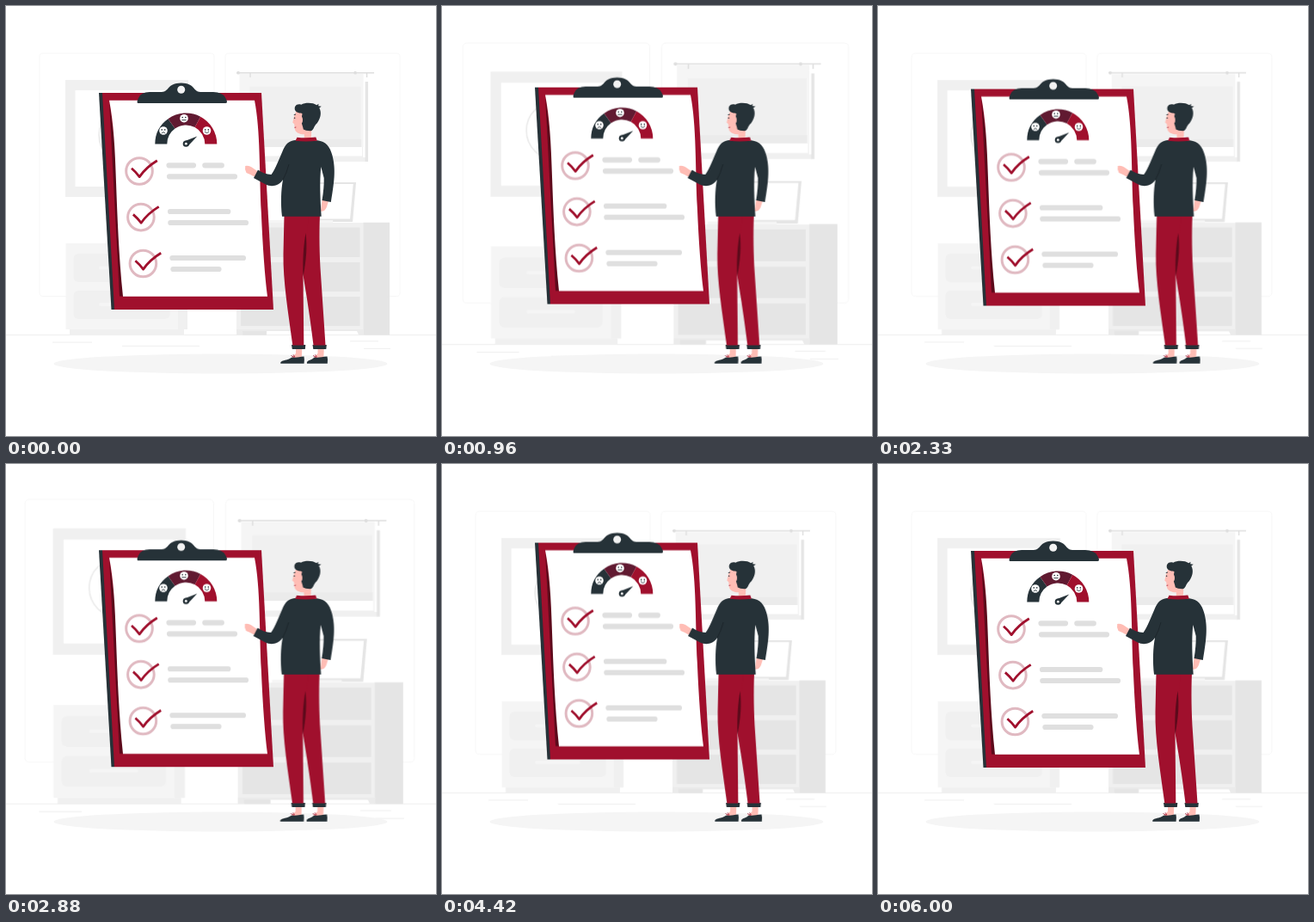
An HTML page for the animation above (6.04 s loop, 500 by 500 pixels).

```html
<!DOCTYPE html>
<html lang="en">
<head>
<meta charset="utf-8">
<title>Checklist</title>
<style>
  html, body { margin: 0; width: 100%; height: 100%; overflow: hidden; background: #fff; }
  svg { display: block; width: 100%; height: 100%; }

  /* 6 s of motion and a 40 ms rest in every loop */
  .room, .board, .man { animation: 6.04s linear infinite; }
  .room { animation-name: beat; transform-origin: 249px 225px; }
  .board { animation-name: float; }
  .man { animation-name: shake; }

  @keyframes beat {
    0%, 29.801%, 39.735%, 59.603%, 100% { transform: scale(1); }
    9.934%, 49.669% { transform: scale(1.1); }
  }
  @keyframes float {
    0%, 49.669%, 99.338%, 100% { transform: translateY(0); }
    24.834%, 74.503% { transform: translateY(-10px); }
  }
  @keyframes shake {
    0%, 49.669%, 99.338%, 100% { transform: translateX(0); }
    4.967%, 44.702%, 54.636%, 94.371% { transform: translateX(-1px); }
    9.934%, 39.735%, 59.603%, 89.404% { transform: translateX(2px); }
    14.901%, 24.834%, 34.768%, 64.57%, 74.503%, 84.437% { transform: translateX(-4px); }
    19.868%, 29.801%, 69.536%, 79.47% { transform: translateX(4px); }
  }

  .dark { fill: #263238; }
  .red { fill: #a0102d; }
  .maroon { fill: #5c0a1b; }
  .skin { fill: #ffbdb5; }
  .white { fill: #fff; }
  .g1 { fill: #f5f5f5; }
  .g2 { fill: #f0f0f0; }
  .g3 { fill: #ebebeb; }
  .g4 { fill: #e5e5e5; }
  .line { fill: none; stroke: #ebebeb; stroke-width: .8; }
  .bars { fill: none; stroke: #dfdfdf; stroke-width: 6.2; stroke-linecap: round; }
  .gauge path { fill: none; stroke-width: 14; }
  .ring { fill: none; stroke: #e0b9c1; stroke-width: 3; }
  .tick { fill: none; stroke: #a0102d; stroke-width: 2.8; stroke-linejoin: round; }
  .mouth { fill: none; stroke: #263238; stroke-width: .9; stroke-linecap: round; }
</style>
</head>
<body>
<svg viewBox="0 0 500 500">
  <defs>
    <g id="face">
      <circle class="white" r="4.8"/>
      <circle class="dark" cx="-1.8" cy="-1.1" r=".8"/>
      <circle class="dark" cx="1.8" cy="-1.1" r=".8"/>
    </g>
    <g id="check">
      <circle class="ring" cx="155" cy="192" r="15.3"/>
      <path class="tick" d="M146 188.8Q151 193 155.2 198.6Q163 187.500 175.800 179.800"/>
    </g>
    <g id="shoe">
      <path class="skin" d="M337 398H344.300L343.800 409H332L337 404Z"/>
      <path class="dark" d="M332 394H348.300L347.800 399H332.800Z"/>
      <path class="dark" d="M319.300 415.800C318.800 413 322 412.500 326 411.500C330 410.500 332 408 334 408.500C338 409.500 341 407.500 346.500 407.500Q347.300 411 346.600 415.800Z"/>
      <path d="M331.500 406.500L335.500 408.500M334 405.300L336 408.300" stroke="#a0102d" stroke-width=".8"/>
    </g>
  </defs>

  <g class="room">
    <rect class="line" x="39" y="55" width="203" height="282.500" rx="4" style="stroke:#f5f5f5"/>
    <rect class="line" x="255" y="55" width="203" height="282.500" rx="4" style="stroke:#f5f5f5"/>
    <path class="line" d="M0 382.500H500M54 391H100M135 395.300H225M400 389.800H433M416 398.300H447"/>

    <!-- picture -->
    <rect class="g2" x="69" y="86" width="143" height="136"/>
    <rect class="white" x="80.500" y="98" width="119" height="112"/>
    <circle class="line" cx="140" cy="150" r="32" style="stroke-width:1.500"/>

    <!-- low cabinet -->
    <rect class="g1" x="69.500" y="276" width="141.500" height="100"/>
    <rect class="g2" x="200" y="276" width="11" height="100"/>
    <rect class="g2" x="74" y="376" width="133" height="6.500"/>
    <rect class="g2" x="78.500" y="288" width="112" height="33" rx="6"/>
    <rect class="g2" x="78.500" y="331" width="112" height="33" rx="6"/>
    <path d="M110 304.500H159M110 347H159" stroke="#f5f5f5" stroke-width="4" stroke-linecap="round"/>

    <!-- window with blind -->
    <rect class="g2" x="275" y="88" width="143" height="93"/>
    <rect class="g4" x="417.500" y="88" width="3.500" height="93"/>
    <rect class="white" x="283" y="100" width="131" height="74.500"/>
    <rect class="white" x="415" y="84" width="2.500" height="92"/>
    <rect class="g1" x="271.500" y="79" width="144" height="85"/>
    <rect class="g2" x="283.500" y="93.500" width="129" height="61.500"/>
    <rect class="g3" x="275" y="155" width="138" height="9"/>
    <path d="M268 77.700H428M284 78V83M419.500 78V83" stroke="#dedede" stroke-width="1.400"/>
    <circle cx="270" cy="77.700" r="1.900" fill="#dedede"/>
    <circle cx="406" cy="77.700" r="1.900" fill="#dedede"/>

    <!-- framed card and tall cabinet -->
    <path class="g4" d="M345 205H407L403 251H345Z"/>
    <path class="white" d="M345 207H403.700L400 247.500H345Z"/>
    <rect class="g1" x="305" y="249" width="75" height="3"/>
    <rect class="g2" x="268" y="252" width="148" height="126"/>
    <rect class="g4" x="415.500" y="251.700" width="30.500" height="130.800"/>
    <path class="g4" d="M273 257.500H411.500V292H273ZM273 298H411.500V332H273ZM273 338H411.500V372H273Z"/>
    <path class="g3" d="M268 376H416V382.500H410L408 378H303V382.500H268Z"/>
    <rect class="g4" x="275" y="378" width="28" height="4.500"/>
  </g>

  <ellipse class="g1" cx="249.500" cy="416" rx="194" ry="11.500"/>

  <g class="board">
    <path class="dark" d="M108 101H114L128 353H122.500Z"/>
    <path class="red" d="M112 101H297L311 353H126Z"/>
    <path class="maroon" d="M120 110L132 337.500H140L132 200Z"/>
    <path class="white" d="M120 109.700H289C296 145 294.500 195 296.800 240C298.500 280 301 315 304 337.800H136C131 290 129.500 245 128 205C126.800 165 125 135 120 109.700Z"/>
    <path class="dark" d="M153.500 113Q151.300 112.500 154 107Q157 100 167 100H181C190 100 187 89.700 203.700 89.600C220 89.700 217.500 100 226 100H241Q251.500 100 255 106.500Q258.800 112.500 255.500 113Z"/>
    <circle cx="203.700" cy="97.200" r="4.500" fill="#f2f2f2"/>

    <g class="gauge">
      <path d="M180.300 160.500A29 29 0 0 1 192.500 136.900" stroke="#263238"/>
      <path d="M192.500 136.900A29 29 0 0 1 222.900 134.900" stroke="#611a31"/>
      <path d="M222.900 134.900A29 29 0 0 1 238.300 160.500" stroke="#a0102d"/>
    </g>
    <use href="#face" x="183" y="145"/>
    <use href="#face" x="207" y="130.700"/>
    <use href="#face" x="233.500" y="145"/>
    <path class="mouth" d="M181 148Q183 145.300 185 148M204.800 132.600H209.200M231.300 146.200Q233.500 149 235.700 146.200"/>
    <path class="dark" d="M207.500 157.300L222.300 151.600L212 162.500Z"/>
    <circle class="dark" cx="209.300" cy="160.200" r="3.600"/>
    <circle class="white" cx="209.300" cy="160.200" r="1.400"/>

    <use href="#check"/>
    <use href="#check" x="1.900" y="53.600"/>
    <use href="#check" x="4.400" y="107.500"/>
    <path class="bars" d="M189.500 185.300H218M231.300 185.300H250.800M190 198.300H266M191 239H258.300M191.300 252H279M193.400 293H276M194.400 306H247.500"/>
  </g>

  <g class="man">
    <use href="#shoe"/>
    <use href="#shoe" transform="translate(51.500) scale(.93 1)" x="-5" style="display:none"/>
    <g transform="translate(25.500)">
      <path class="skin" d="M337 398H344.300L343.800 409H332L337 404Z"/>
      <path class="dark" d="M331 394H347.300L346.800 399H331.800Z"/>
      <path class="dark" d="M324.500 415.800C324 413 326 412.500 329 411.300C332 410 332.500 408 334.500 408.500C338 409.500 342 407.500 348 407.500Q349 411 348.300 415.800Z"/>
      <path d="M331.500 406.500L335.500 408.500M334 405.300L336 408.300" stroke="#a0102d" stroke-width=".8"/>
    </g>

    <!-- trousers -->
    <path class="red" d="M338 243H365C364 265 364.500 290 366 312L371.500 394.500H357.500C354 365 350 340 346 316Z"/>
    <path class="red" d="M323.500 243H352L345.500 313L346.300 394.500H333.300C328 355 322 320 322.500 288Z"/>
    <path class="maroon" d="M348.500 264C350 278 350 290 345.500 315C344.700 296 346 278 348.500 264Z"/>

    <!-- hands -->
    <path class="skin" d="M278.200 186Q281 185.300 285 187L293 192.500L289.500 199Q285 196 279.500 194Q277.300 190 278.200 186Z"/>
    <path class="skin" d="M367.500 225.500L375 227L372.800 234Q370.500 239.300 366 238.800L366.500 233Z"/>

    <!-- sweater -->
    <path class="dark" d="M336 156Q350 158 362 156.200C372 157.500 376.500 163 379.500 174C383 188 382.700 200 377.800 228L367.500 226Q370 211 369.700 200L366.300 187C364.500 205 365.500 224 366.700 244.700H321C319.300 230 319.700 214 322 202C317 210 308 210.500 302 207.500L288 200L293 190.500Q300 195.500 308.500 196C313 190 318 177 321.500 169C325 160.500 329 156.700 336 156Z"/>
    <path d="M322 202Q326.500 194 329 184" fill="none" stroke="#1b2429" stroke-width=".8"/>

    <!-- head -->
    <path class="skin" d="M344.500 140H355.500L354.800 154H346.800V149.300C341 149.300 336.600 147 335.800 143L335.200 137.300L333.300 135.500L335 128L338 121L350 122V140Z"/>
    <path class="red" d="M338.500 152.800Q349 154 360.300 152.500L361.800 156.700Q349 158 336.500 156.800Z"/>
    <path class="dark" d="M336.300 121.500C334.300 117 338 112.800 343.300 114.700C348 112 357 112.200 361.300 115.300L363.500 113.800L363.200 116.200L366.800 116.800L364.300 118.500C367.500 124 365.500 131.500 361.500 136.500C357.500 140 358 144.500 354.500 145.300Q348.500 145.500 345.800 143.500C345.200 139 343.300 137 343.500 132L344.500 125C342.500 124.500 338 124.500 336.300 121.500Z"/>
    <ellipse class="skin" cx="342.300" cy="132.500" rx="2.700" ry="4.300"/>
    <path d="M334.800 126.500L337 126" stroke="#263238" stroke-width="1"/>
    <circle class="dark" cx="335.600" cy="130.300" r=".8"/>
    <path d="M335.500 141.300L337.300 141" stroke="#a0102d" stroke-width=".8"/>
  </g>
</svg>
</body>
</html>
```
